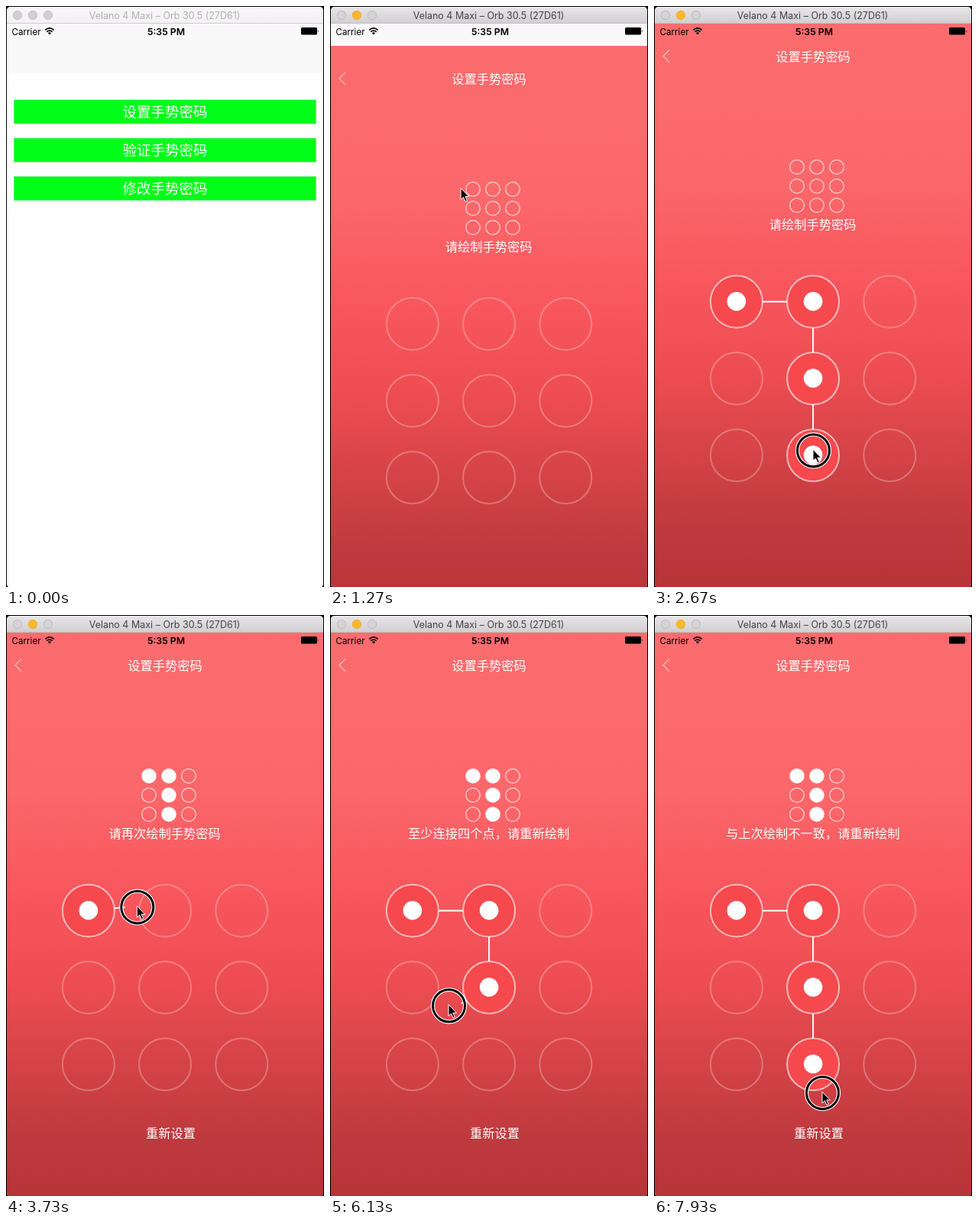
These frames come from a looping animation (416 px wide and 758 px high, 8 s). An HTML page:

```html
<!DOCTYPE html>
<html lang="zh-CN">
<head>
<meta charset="utf-8">
<title>Gesture password</title>
<style>
  html, body { margin: 0; width: 100%; height: 100%; overflow: hidden; background: #000; }
  svg { display: block; width: 100vw; height: 100vh; }
  text { text-anchor: middle; font-family: Inter, Roboto, sans-serif; }
  .zh { fill: #fff; font: 16.25px "Noto Sans CJK SC", "Noto Sans CJK", sans-serif; }
  .button .zh { font-size: 18.5px; }
  .button rect { fill: #00ff18; stroke: #6cf27c; }
  .bar { fill: url(#barIdle); }
  .light { fill: #d0cfd0; stroke: #bcbbbc; stroke-width: .8; }
  .caption { fill: #b3b2b3; font-size: 12.5px; }
  .active .bar { fill: url(#barActive); }
  .active .caption { fill: #454445; }
  .active .light { fill: #d5d4d5; stroke: #b5b4b5; }
  .active .amber { fill: #fdb728; stroke: #eaa925; }
  .mini { fill: none; stroke: #fff; stroke-opacity: .6; stroke-width: 1.5; }
  .mini.on { fill: #fff; }
  .node circle { fill: none; stroke: #fff; stroke-opacity: .27; stroke-width: 2; }
  .node .core { visibility: hidden; stroke: none; }
  .node.on circle { fill: #f5494e; stroke-opacity: .62; }
  .node.on .core { visibility: visible; fill: #fff; }
  #trail { fill: none; stroke: #fff; stroke-width: 2; stroke-linejoin: round; }
</style>
</head>
<body>
<svg viewBox="0 0 416 758" preserveAspectRatio="none">
  <defs>
    <clipPath id="window"><rect x="1" y="1" width="414" height="758" rx="5"/></clipPath>
    <clipPath id="screen"><rect x="1" y="23" width="414" height="735"/></clipPath>
    <linearGradient id="barIdle" x2="0" y2="1">
      <stop stop-color="#f8f6f8"/><stop offset="1" stop-color="#f3f1f3"/>
    </linearGradient>
    <linearGradient id="barActive" x2="0" y2="1">
      <stop stop-color="#e9e7e9"/><stop offset="1" stop-color="#d0ced0"/>
    </linearGradient>
    <linearGradient id="red" x2="0" y2="1">
      <stop stop-color="#fb6c6f"/>
      <stop offset=".27" stop-color="#fb686b"/>
      <stop offset=".48" stop-color="#f7555c"/>
      <stop offset=".62" stop-color="#ed4d52"/>
      <stop offset=".89" stop-color="#bf3a3e"/>
      <stop offset="1" stop-color="#b73439"/>
    </linearGradient>
  </defs>

  <g clip-path="url(#window)">
    <rect width="416" height="758" fill="#fff"/>
    <rect y="23" width="416" height="64" fill="#f8f8f8"/>
    <g id="buttons"></g>

    <g clip-path="url(#screen)">
      <g id="sheet">
        <rect y="23" width="416" height="735" fill="url(#red)"/>
        <path d="M20 57.5 12 65.5 20 73.5" fill="none" stroke="#fff"/>
        <text class="zh" x="208" y="71.5">设置手势密码</text>
        <g id="minis"></g>
        <text class="zh" id="message" x="207.7" y="290.5"></text>
        <polyline id="trail"/>
        <g id="nodes"></g>
        <text class="zh" id="reset" x="215.5" y="681.5">重新设置</text>
      </g>
    </g>

    <g id="titlebar">
      <rect class="bar" width="416" height="23"/>
      <path d="M0 22.5H416" stroke="#b8b6b8" stroke-opacity=".6"/>
      <circle class="light" cx="15" cy="12" r="5.7"/>
      <circle class="light amber" cx="35" cy="12" r="5.7"/>
      <circle class="light" cx="55" cy="12" r="5.7"/>
      <text class="caption" x="207.5" y="16.5">Velano 4 Maxi – Orb 30.5 (27D61)</text>
    </g>

    <g id="status">
      <text x="26.5" y="37.8" font-size="11.7">Carrier</text>
      <path d="M51.3 31.4Q57 26.4 62.7 31.4M53.3 33.7Q57 30.4 60.7 33.7"
        fill="none" stroke="#000" stroke-width="1.7"/>
      <path d="M54.9 35.2Q57 33.4 59.1 35.2L57 37.5Z"/>
      <text x="209.5" y="37.8" font-size="12.3" font-weight="600">5:35 PM</text>
      <rect x="386" y="28" width="21" height="9.4" rx="1.5"/>
      <path d="M408 31q1.6 1.7 0 3.4z"/>
    </g>
  </g>

  <g id="pointer">
    <g id="ring" fill="none" transform="translate(.5 1.5)">
      <circle r="21" stroke="#fff" stroke-width="5.2"/>
      <circle r="21" stroke="#000" stroke-width="3"/>
    </g>
    <path d="M0 0V14.8L3.4 11.7 5.9 17.4 8.3 16.3 5.8 10.8H10.6Z" stroke="#fff"/>
  </g>
</svg>

<script>
const LOOP = 8000, STEP = 200 / 3;
const LAG = 63, HOLD = 80, GLIDE = 700;
const OPEN = 992;
const $ = id => document.getElementById(id);
const show = (el, on) => el.setAttribute('visibility', on ? 'inherit' : 'hidden');
const grid = (x, y, dx, dy) =>
  Array.from({ length: 9 }, (_, i) => [x + i % 3 * dx, y + Math.floor(i / 3) * dy]);

// Each press follows its route at an even speed; the pointer glides on to the next one.
const tap = { start: 850, end: 880, route: [[214.5, 137]] };
const strokes = [
  { start: 1690, end: 2740, route: [[108, 384], [208, 392], [208, 600]],
    reply: '请再次绘制手势密码' },
  { start: 3480, end: 3880, route: [[108, 386], [208, 376]],
    reply: '至少连接四个点，请重新绘制' },
  { start: 5150, end: 6310, route: [[112, 389], [208, 389], [208, 503], [108, 513]],
    reply: '与上次绘制不一致，请重新绘制' },
  { start: 6930, end: 7930, route: [[108, 386], [208, 386], [208, 589], [220, 622]], reply: '' }
];
const presses = [{ start: 0, end: 0, route: [[300, 750]] }, tap, ...strokes];
const nodes = grid(107.9, 385.8, 100.2, 100.2);
const saved = [0, 1, 4, 7];

$('buttons').innerHTML = ['设置', '验证', '修改'].map((verb, i) =>
  `<g class="button" transform="translate(0 ${i * 50})">
    <rect x="10.5" y="122.5" width="395" height="31"/>
    <text class="zh" x="208" y="144.5">${verb}手势密码</text></g>`).join('');
$('minis').innerHTML = grid(187, 210, 26, 25).map(([x, y]) =>
  `<circle class="mini" cx="${x}" cy="${y}" r="9.3"/>`).join('');
$('nodes').innerHTML = nodes.map(([x, y]) =>
  `<g class="node" transform="translate(${x} ${y})"><circle r="34"/><circle class="core" cy="-.4" r="12.3"/></g>`).join('');
const miniEls = [...$('minis').children], nodeEls = [...$('nodes').children];

const clamp = v => Math.min(1, Math.max(0, v));
const smooth = k => k * k * (3 - 2 * k);
const mix = (a, b, k) => a.map((v, i) => v + (b[i] - v) * k);
const distance = (a, b) => Math.hypot(a[0] - b[0], a[1] - b[1]);

function along(route, k) {
  const lengths = route.slice(1).map((p, i) => distance(route[i], p));
  let left = k * lengths.reduce((a, b) => a + b, 0);
  for (let i = 0; i < lengths.length; i++) {
    if (left <= lengths[i]) return mix(route[i], route[i + 1], left / lengths[i]);
    left -= lengths[i];
  }
  return route[route.length - 1];
}

function pointerAt(t) {
  const i = presses.findLastIndex(p => p.start <= t);
  const { start, end, route } = presses[i], next = presses[i + 1];
  if (t < end) return along(route, (t - start) / (end - start));
  const from = route[route.length - 1];
  return next ? mix(from, next.route[0], smooth(clamp((t - end - HOLD) / GLIDE))) : from;
}

// Nodes touched so far, in order
function visited(start, end) {
  const order = new Set();
  for (let t = start; t <= end; t += 10) {
    const hit = nodes.findIndex(n => distance(n, pointerAt(t)) < 33);
    if (hit >= 0) order.add(hit);
  }
  return [...order];
}

function render(t) {
  const isDown = p => t >= p.start && t < p.end + HOLD;
  const stroke = strokes.find(isDown);
  const done = strokes.filter(s => t >= s.end + HOLD);
  const order = stroke ? visited(stroke.start, t - LAG) : [];

  $('titlebar').setAttribute('class', t > 925 ? 'active' : '');
  const phase = Math.max(0, t - OPEN) * .01826;
  const drop = Math.round(735 * (1 + phase) * Math.exp(-phase));
  $('sheet').setAttribute('transform', `translate(0 ${drop})`);

  $('message').textContent = done.length ? done[done.length - 1].reply : '请绘制手势密码';
  show($('reset'), done.length);
  miniEls.forEach((el, i) => el.classList.toggle('on', done.length > 0 && saved.includes(i)));
  nodeEls.forEach((el, i) => el.classList.toggle('on', order.includes(i)));
  const points = order.map(i => nodes[i]);
  if (points.length) points.push(pointerAt(t - LAG));
  $('trail').setAttribute('points', points.join(' '));

  show($('pointer'), t >= STEP);
  show($('ring'), stroke || isDown(tap));
  $('pointer').setAttribute('transform', `translate(${pointerAt(t)})`);
}

function tick() {
  const t = performance.now() % LOOP;
  render(Math.floor((t + 5) / STEP) % 120 * STEP);
  requestAnimationFrame(tick);
}
tick();
</script>
</body>
</html>
```
